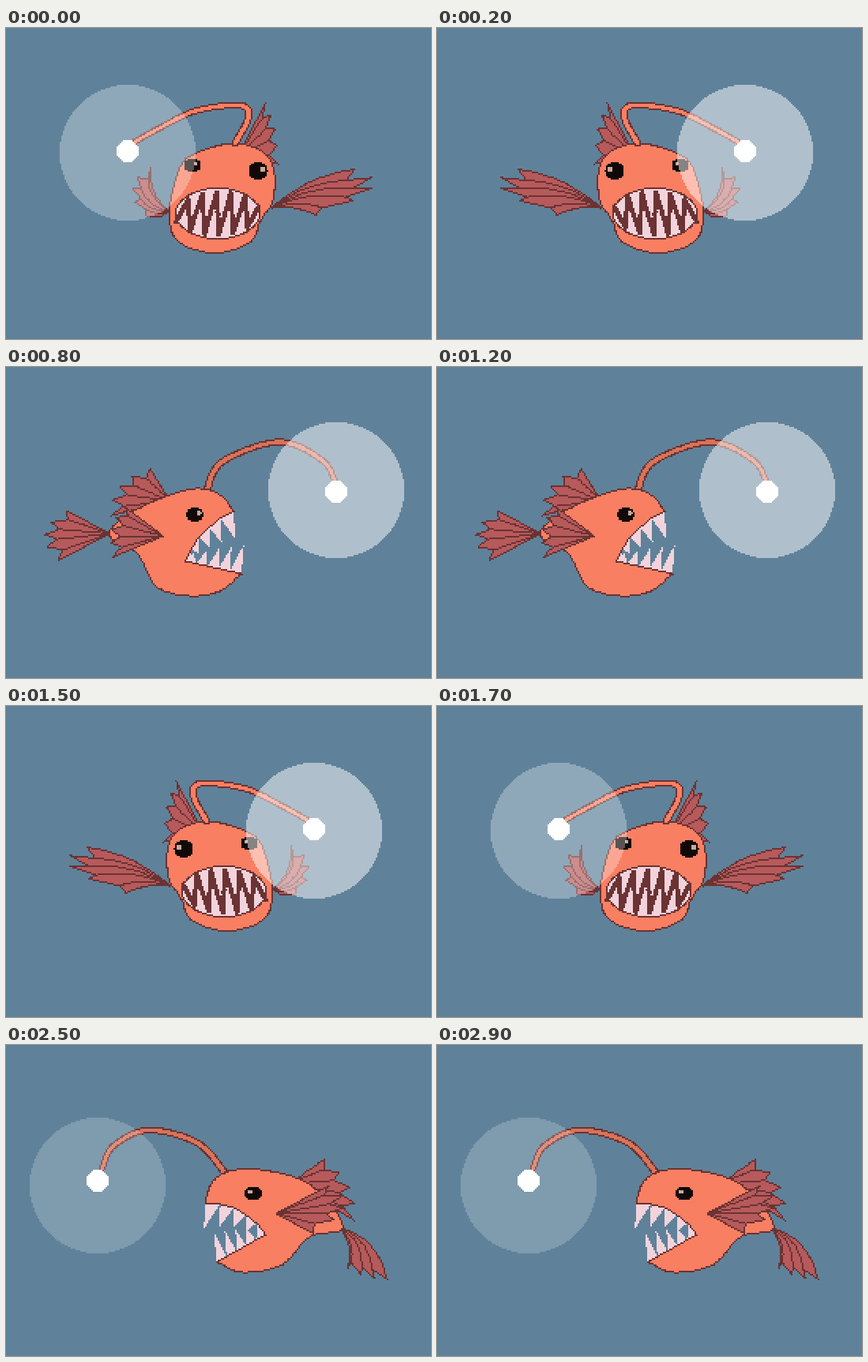
Recreate the animation shown at these times as an HTML page with a canvas. Size 538 by 394 pixels, loop 3 s.

```html
<!DOCTYPE html>
<html>
<head>
<meta charset="utf-8">
<style>
html, body { margin: 0; width: 100%; height: 100%; overflow: hidden; background: #5f829a; }
canvas { display: block; width: 538px; height: 394px; image-rendering: pixelated; }
</style>
</head>
<body>
<canvas width="269" height="197"></canvas>
<script>
const ctx = document.querySelector('canvas').getContext('2d');
const WATER = '#5f829a', SKIN = '#f97f62', FIN = '#b75a5c', LINE = '#6b3333',
      STALK = '#d97359', TOOTH = '#f2d3dc', EYE = '#110909';

// Coordinates are stage pixels; everything is plotted on 2 px cells.
const parse = s => s.split(' ').map(p => p.split(',').map(Number));
const mix = (a, b, k) => [a[0] + (b[0] - a[0]) * k, a[1] + (b[1] - a[1]) * k];
const bezier = (a, b, c, k) => mix(mix(a, b, k), mix(b, c, k), k);

// Smooth path through key points.
function curve(pts, closed = false, steps = 8) {
  const n = pts.length, out = [];
  const at = i => closed ? pts[(i + n) % n] : pts[Math.min(n - 1, Math.max(0, i))];
  for (let i = 0; i < (closed ? n : n - 1); i++) {
    const [p, q, r, s] = [-1, 0, 1, 2].map(d => at(i + d));
    for (let j = 0; j < steps; j++) {
      const t = j / steps;
      out.push([0, 1].map(c => q[c] + t / 2 * (r[c] - p[c] +
        t * (2 * p[c] - 5 * q[c] + 4 * r[c] - s[c] + t * (3 * (q[c] - r[c]) + s[c] - p[c])))));
    }
  }
  return closed ? out : [...out, pts[n - 1]];
}

function line(pts) {
  ctx.fillStyle = LINE;
  for (let i = 0; i + 1 < pts.length; i++) {
    const [a, b] = [pts[i], pts[i + 1]];
    const n = Math.ceil(Math.max(Math.abs(b[0] - a[0]), Math.abs(b[1] - a[1])) / 2) || 1;
    for (let j = 0; j <= n; j++) {
      const [x, y] = mix(a, b, j / n);
      ctx.fillRect(Math.floor(x / 2), Math.floor(y / 2), 1, 1);
    }
  }
}

function span(row, from, to) {
  const a = Math.round(from / 2);
  ctx.fillRect(a, row, Math.round(to / 2) - a, 1);
}

function poly(pts, fill, outline = true) {
  ctx.fillStyle = fill;
  for (let row = 0; row < 197; row++) {
    const y = row * 2 + 1, hits = [];
    pts.forEach((a, i) => {
      const b = pts[(i + 1) % pts.length];
      if (a[1] <= y !== b[1] <= y) hits.push(mix(a, b, (y - a[1]) / (b[1] - a[1]))[0]);
    });
    hits.sort((a, b) => a - b);
    for (let i = 0; i + 1 < hits.length; i += 2) span(row, hits[i], hits[i + 1]);
  }
  if (outline) line([...pts, pts[0]]);
}

function disc(x, y, rx, ry, fill) {
  ctx.fillStyle = fill;
  for (let row = Math.floor((y - ry) / 2); row * 2 <= y + ry; row++) {
    const k = 1 - ((row * 2 + 1 - y) / ry) ** 2;
    if (k > 0) span(row, x - rx * Math.sqrt(k), x + rx * Math.sqrt(k));
  }
}

// A fan from the root; its tips lie on an arc through three points.
function fin(points, count, bend = 0) {
  const [root, a, b, c] = parse(points);
  const arc = t => [0, 1].map(i =>
    (1 - t) * (1 - 2 * t) * a[i] + 4 * t * (1 - t) * b[i] + t * (2 * t - 1) * c[i]);
  const rib = tip => {
    const [x, y] = mix(root, tip, .5);
    const knee = [x + (tip[1] - root[1]) * bend * 2, y - (tip[0] - root[0]) * bend * 2];
    return [0, .2, .4, .6, .8, 1].map(k => bezier(root, knee, tip, k));
  };
  const edge = [], ribs = [];
  for (let i = 1; i < count; i++) {
    const notch = mix(root, arc((i - .5) / (count - 1)), .8);
    edge.push(notch, arc(i / (count - 1)));
    ribs.push(rib(notch));
  }
  poly([...rib(a), ...edge, ...rib(c).reverse()], FIN);
  ribs.forEach(line);
}

function stalk(points, color) {
  const pts = curve(parse(points), false, 24);
  for (const [inset, fill] of [[0, LINE], [2, color]])
    pts.forEach(([x, y], i) => {
      const r = 5 - i / pts.length - inset;
      disc(x, y, r, r, fill);
    });
}

function eye(x, y, rx, ry, glint) {
  disc(x, y, rx, ry, EYE);
  disc(x + glint, y - 2, 3, 3, '#c9aa98');
}

function lamp(x, y, coreX, coreY, alpha) {
  disc(x, y, 86, 86, `rgba(255,255,255,${alpha})`);
  disc(coreX, coreY, 14, 14, '#fff');
}

// Teeth stand along a jaw and shrink towards the corner of the mouth.
function teeth(jaw, lean, height) {
  const count = 5;
  for (let i = 0; i < count; i++) {
    const a = jaw(i / count), b = jaw((i + 1) / count), size = 1 - i / (count + 1);
    const [x, y] = mix(a, b, .4);
    poly([a, [x + lean * size, y + height * size], b], TOOTH, false);
  }
}

// body runs from the upper lip round the back to the lower lip;
// mouth holds the bow of the upper jaw and the corner.
const poses = {
  up: {
    tail: ['114,220 41,198 64,163 92,168', 6, .1],
    dorsal: ['186,180 174,134 130,152 115,198', 5],
    side: ['180,225 132,186 108,213 117,244', 5],
    body: '266,184 246,165 218,160 160,182 108,219 146,246 176,278 214,295 262,284 284,262',
    mouth: '226,207 210,252',
    stalk: '227,160 246,118 312,83 368,97 390,128',
    eye: [214, 188, 11, 9, 5], lamp: [390, 142, 392, 138]
  },
  level: {
    tail: ['132,211 76,182 49,212 66,245', 5],
    dorsal: ['208,170 182,129 144,152 133,188', 5],
    side: ['199,214 150,176 134,206 135,241', 5],
    body: '288,182 268,160 232,155 170,178 130,211 166,236 190,278 232,290 270,284 298,262',
    mouth: '244,204 226,246',
    stalk: '254,157 274,120 346,95 400,118 417,146',
    eye: [239, 187, 11, 9, 5], lamp: [418, 156, 418, 158]
  },
  down: {
    tail: ['420,230 482,297 458,294 432,283', 4, .16],
    dorsal: ['358,176 403,145 434,180 441,222', 5],
    side: ['342,213 408,178 426,206 388,238', 5],
    body: '252,200 264,170 300,157 362,166 400,190 426,232 384,243 350,278 300,288 267,275',
    mouth: '302,200 329,240',
    stalk: '278,163 242,124 180,108 136,128 122,156',
    eye: [313, 188, 11, 9, -4], lamp: [116, 178, 116, 172]
  }
};

function place(flip, shift = 0) {
  ctx.setTransform(flip ? -1 : 1, 0, 0, 1, flip ? 272 - shift : shift, shift);
}

function drawSide(p, alpha) {
  const back = parse(p.body), [bow, corner] = parse(p.mouth);
  const upperLip = back[0], lowerLip = back[back.length - 1];
  const upper = k => bezier(upperLip, bow, corner, k), lower = k => mix(lowerLip, corner, k);
  const lean = Math.sign(upperLip[0] - corner[0]) * 9;
  fin(...p.tail);
  fin(...p.dorsal);
  stalk(p.stalk, STALK);
  teeth(upper, lean, 32);
  teeth(lower, lean, -36);
  poly([...curve(back), corner, ...[.8, .6, .4, .2].map(upper)], SKIN);
  fin(...p.side);
  eye(...p.eye);
  lamp(...p.lamp, alpha);
}

function grin(x, y, rx, ry) {
  disc(x, y, rx, ry, LINE);
  disc(x, y, rx - 2, ry - 2, TOOTH);
  const folds = 11, zigzag = [];
  for (let i = 0; i <= folds; i++) {
    const u = (i / folds * 2 - 1) * .92, side = i % 2 ? -1 : 1;
    zigzag.push([x + u * rx + side * -3, y + side * (ry - 6) * Math.sqrt(1 - u * u)]);
  }
  for (let i = 0; i < folds; i++)
    for (let k = 0; k < 1; k += .05) disc(...mix(zigzag[i], zigzag[i + 1], k), 3, 3, LINE);
}

function drawFront(ahead, alpha, flip) {
  const sideFin = () => fin('207,232 183,176 160,204 178,238', 5, .14);
  if (ahead) { place(true); sideFin(); place(false); }
  else { place(flip); fin('336,228 441,179 462,203 392,237', 5, .08); }
  fin('294,162 328,95 340,128 344,172', 5);
  sideFin();
  poly(curve(parse('232,163 290,146 334,166 339,214 322,244 310,270 266,285 218,271 207,236 215,192'), true), SKIN);
  stalk(ahead ? '284,146 280,112 272,88' : '290,146 307,113 296,98 240,105 192,128 162,145', SKIN);
  eye(236, 174, 11, 9, 4);
  eye(319, 181, 12, 11, 6);
  grin(268, 235, 54, 33);
  if (ahead) lamp(272, 84, 272, 84, alpha);
  else lamp(154, 158, 154, 156, alpha);
}

function swim(step, left) {
  const pose = ['level', 'up', 'level', 'down'][step];
  place(left !== (pose === 'down'), step === 2 ? 2 : 0);
  drawSide(poses[pose], .5 - step / 10);
}

function turn(step) {
  drawFront(step === 1, .3 + step / 10, step === 2);
}

let shown = -1;
function tick() {
  const n = Math.floor(performance.now() / 100) % 30;
  if (n !== shown) {
    shown = n;
    place(false);
    ctx.fillStyle = WATER;
    ctx.fillRect(0, 0, 269, 197);
    if (n < 3) turn(n);
    else if (n < 15) swim(n % 4, false);
    else if (n < 18) turn(17 - n);
    else swim((n - 18) % 4, true);
  }
  requestAnimationFrame(tick);
}
tick();
</script>
</body>
</html>
```
